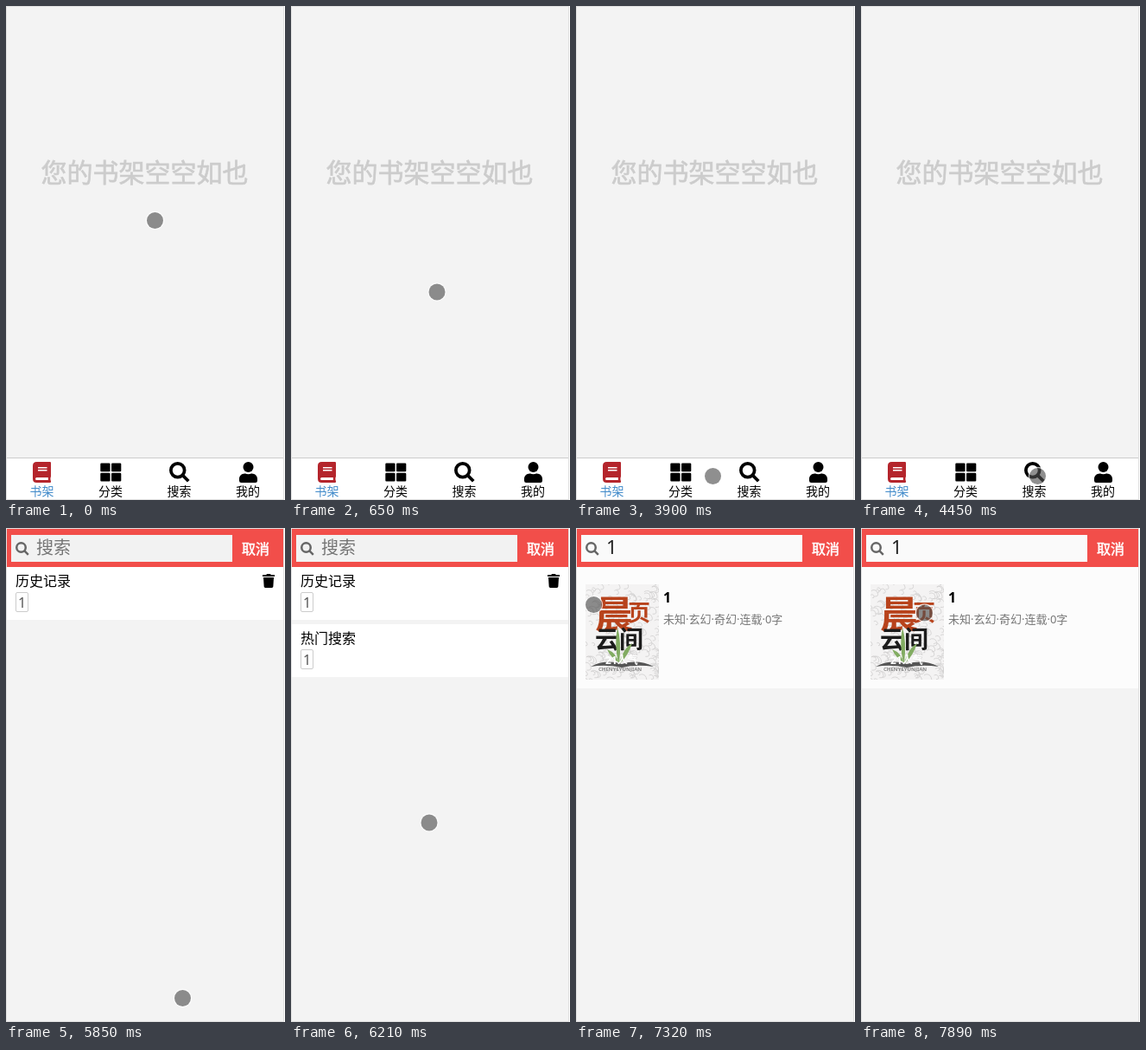
Write an HTML page that moves like this. It is 323 px wide and 570 px high and loops after 8 s.

```html
<!DOCTYPE html>
<html lang="zh-CN">
<head>
<meta charset="utf-8">
<style>
  html, body { margin: 0; width: 100%; height: 100%; overflow: hidden; background: #fff; }
  svg { display: block; width: 100%; height: 100%; }
  text { font-family: "Noto Sans", "Noto Sans CJK SC", "Noto Sans CJK", sans-serif; font-size: 16px; }
  .label { font-size: 14px; text-anchor: middle; }
  .tag rect { fill: #fff; stroke: #ccc; }
  .tag text { fill: #555; }
</style>
</head>
<body>
<svg viewBox="0 0 323 570">
  <defs>
    <path id="book" fill-rule="evenodd" d="M448 360V24Q448 0 424 0H96Q0 0 0 96V416Q0 512 96 512H424Q448 512 448 488V472Q448 460 439 453Q433 416 439 379Q448 372 448 360ZM128 128H352V160H128ZM128 192H352V224H128ZM381 448H96A32 32 0 0 1 96 384H381Q378 416 381 448Z"/>
    <g id="grid">
      <rect y="32" width="240" height="208" rx="24"/>
      <rect x="272" y="32" width="240" height="208" rx="24"/>
      <rect y="272" width="240" height="208" rx="24"/>
      <rect x="272" y="272" width="240" height="208" rx="24"/>
    </g>
    <g id="lens" fill="none" stroke="currentColor" stroke-width="80">
      <circle cx="208" cy="208" r="168"/>
      <path d="M318 318L474 474"/>
    </g>
    <g id="user">
      <circle cx="224" cy="128" r="128"/>
      <path d="M314 288H297Q224 320 151 288H134C60 288 0 348 0 422V464Q0 512 48 512H400Q448 512 448 464V422C448 348 388 288 314 288Z"/>
    </g>
    <path id="trash" d="M432 32H312L303 13Q296 0 281 0H167Q152 0 145 13L136 32H16Q0 32 0 48V80Q0 96 16 96H432Q448 96 448 80V48Q448 32 432 32ZM53 467Q56 512 101 512H347Q392 512 395 467L416 128H32Z"/>
    <clipPath id="coverClip"><rect x="11" y="65" width="85" height="110"/></clipPath>
  </defs>

  <rect x="1" y="1" width="320" height="568" fill="#f3f3f3"/>

  <g id="shelf">
    <text x="40.5" y="203.3" style="font-size:30px" fill="#ccc" stroke="#ccc" stroke-width=".7">您的书架空空如也</text>
    <rect x="1" y="521" width="320" height="48" fill="#fff"/>
    <path d="M1 521.5H321" stroke="#ccc"/>
    <use href="#book" transform="translate(31 526) scale(.0469)" fill="#b4252c"/>
    <use href="#grid" transform="translate(109.3 526) scale(.0469)"/>
    <use href="#lens" transform="translate(189 526) scale(.0469)"/>
    <use href="#user" transform="translate(270 526) scale(.0469)"/>
    <text class="label" x="41.5" y="564.6" fill="#428bca">书架</text>
    <text class="label" x="121" y="564.6">分类</text>
    <text class="label" x="200.5" y="564.6">搜索</text>
    <text class="label" x="280" y="564.6">我的</text>
  </g>

  <g id="header">
    <rect x="1" y="1" width="320" height="44" fill="#f24e4a"/>
    <rect id="field" x="6" y="8" width="256" height="31"/>
    <use href="#lens" transform="translate(11 16) scale(.03125)" color="#666"/>
    <text id="query" x="35" y="30"></text>
    <text x="273" y="30" fill="#fff" stroke="#fff" stroke-width=".5">取消</text>
  </g>

  <g id="history">
    <rect x="1" y="45" width="320" height="61" fill="#fff"/>
    <text x="11" y="66.5">历史记录</text>
    <use href="#trash" transform="translate(297 53) scale(.03125)"/>
    <g class="tag"><rect x="11.5" y="74.5" width="14" height="22" rx="1.5"/><text x="14" y="92">1</text></g>
  </g>

  <g id="popular">
    <rect x="1" y="111" width="320" height="61" fill="#fff"/>
    <text x="11" y="132.5">热门搜索</text>
    <g class="tag"><rect x="11.5" y="140.5" width="14" height="22" rx="1.5"/><text x="14" y="158">1</text></g>
  </g>

  <g id="result">
    <rect x="1" y="45" width="320" height="140" fill="#fcfcfc"/>
    <g clip-path="url(#coverClip)">
      <rect x="11" y="65" width="85" height="110" fill="#f4f3f3"/>
      <g id="swirls" fill="none" stroke="#d0cece" stroke-width=".8"></g>
      <g fill="#b8431c" font-weight="700">
        <text x="22" y="116" style="font-size:44px">晨</text>
        <text x="60" y="107" style="font-size:26px">页</text>
      </g>
      <text x="22" y="139" style="font-size:28px" font-weight="900" fill="#1c1c1c">云间</text>
      <path d="M49 156Q44 134 48 115Q53 130 50 156Q55 138 65 133Q60 148 51 156Q40 150 36 140Q47 144 49 156Z" fill="#82ac62"/>
      <path d="M17 160Q34 151 53 157Q72 151 90 160Q70 157 53 161Q34 157 17 160Z" fill="#555"/>
      <text x="34" y="157" style="font-size:12px" font-weight="700" fill="#fff">21人气</text>
      <text x="26" y="165" style="font-size:6px" font-weight="700" fill="#888">CHENYEYUNJIAN</text>
    </g>
    <text x="101" y="86" font-weight="700">1</text>
    <text x="101" y="110" style="font-size:13px" fill="#777">未知·玄幻·奇幻·连载·0字</text>
  </g>

  <rect x=".5" y=".5" width="321" height="569" fill="none" stroke="#e0e0e0"/>
  <g id="cursor">
    <circle r="10" fill="none" stroke="#fff" stroke-opacity=".7" stroke-width="1.4"/>
    <circle r="9.5" fill="#505050" fill-opacity=".64"/>
  </g>
</svg>
<script>
  const LOOP = 8000, SEARCH_AT = 5850, POPULAR_AT = 5970, RESULT_AT = 7320;
  const $ = id => document.getElementById(id);

  // The pointer jumps between sampled positions: time, x, y
  const pointer = [
    [0, 172.5, 247.5], [500, 172.5, 266.5], [650, 169, 330], [770, 158, 430],
    [890, 138.5, 523.5], [1040, 141.5, 539], [1160, 124, 542.5],
    [3900, 158.5, 542.5], [4020, 218, 542.5], [4180, 230.5, 542.5],
    [4320, 219, 542.5], [4450, 204.5, 542.5],
    [6090, 196, 490], [6210, 160, 340], [6340, 107.5, 177.5],
    [6490, 67.5, 127.5], [6630, 32, 96], [6750, 20.5, 88.5],
    [7740, 23.5, 88.5], [7890, 73.5, 98]
  ];

  let seed = 7;
  const random = () => (seed = seed * 16807 % 2147483647) / 2147483647;
  let swirls = '';
  for (let i = 0; i < 150; i++) {
    const x = 8 + random() * 88, y = 62 + random() * 113, r = 2 + random() * 4;
    swirls += `M${x} ${y}a${r} ${r} 0 0 1 ${r * 1.6} ${r * .5}`;
    swirls += `q${r * .4} ${r} ${-r * .8} ${r * .9}`;
  }
  $('swirls').innerHTML = `<path d="${swirls}"/>`;

  const show = (id, on) => $(id).style.display = on ? '' : 'none';

  function draw(now) {
    const t = now % LOOP;
    const searching = t >= SEARCH_AT, found = t >= RESULT_AT;
    show('shelf', !searching);
    show('header', searching);
    show('history', searching && !found);
    show('popular', t >= POPULAR_AT && !found);
    show('result', found);
    $('query').textContent = found ? '1' : '搜索';
    $('query').style.fontSize = found ? '22px' : '20px';
    $('query').setAttribute('fill', found ? '#222' : '#757575');
    $('field').setAttribute('fill', found ? '#fafafa' : '#f2f2f2');

    const [, x, y] = pointer.findLast(step => step[0] <= t);
    $('cursor').setAttribute('transform', `translate(${x} ${y})`);
  }

  const start = performance.now();
  function tick() {
    draw(performance.now() - start);
    requestAnimationFrame(tick);
  }
  tick();
</script>
</body>
</html>
```
